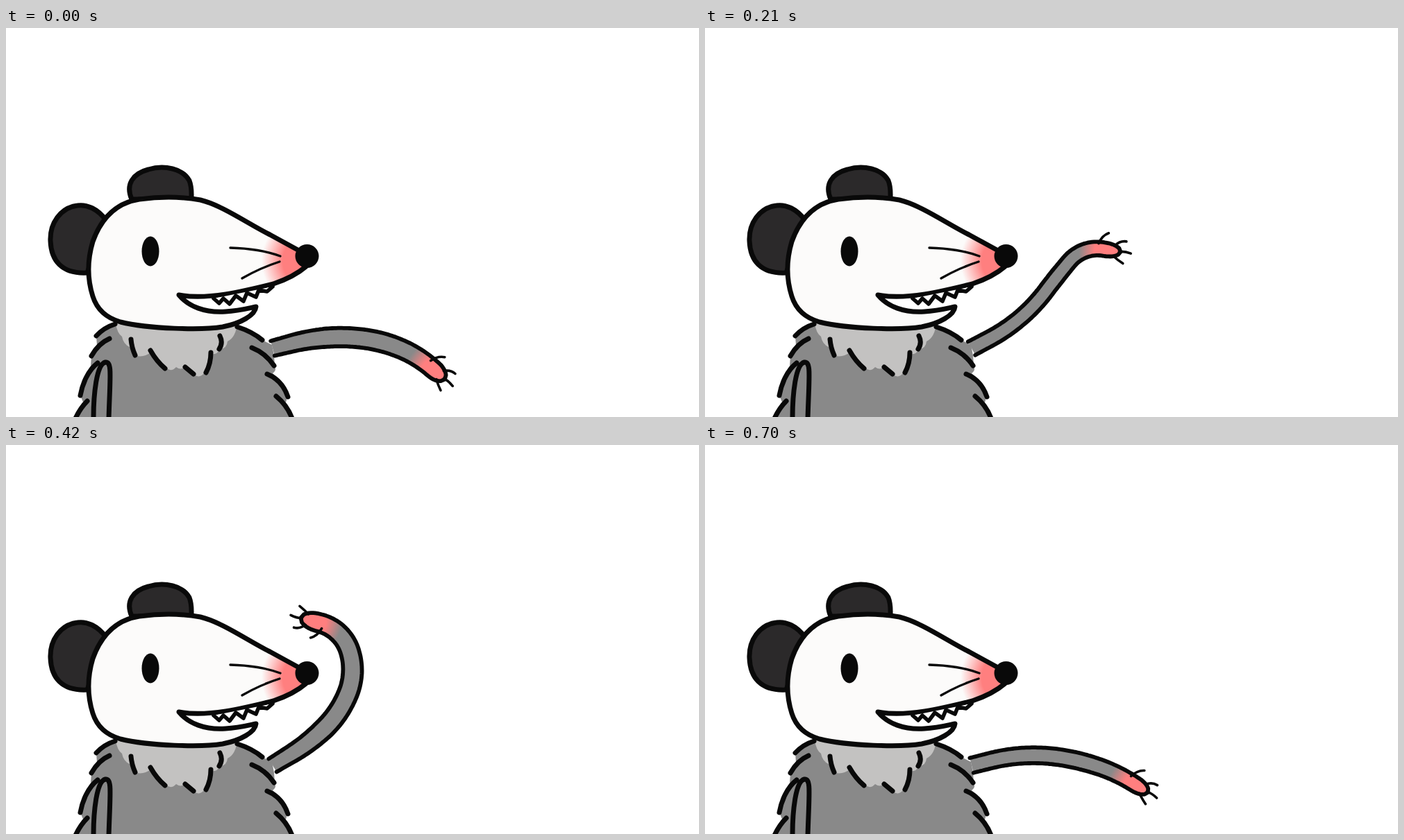
An HTML page that plays this animation: 998x561 px, repeating every 0.77 s.

```html
<!DOCTYPE html>
<html lang="en">
<head>
<meta charset="utf-8">
<title>Waving opossum</title>
<style>
  html, body { margin: 0; width: 100%; height: 100%; overflow: hidden; background: #fff; }
  svg { display: block; width: 100%; height: 100%; }
  .ink { fill: none; stroke: #090909; stroke-width: 7; stroke-linecap: round; stroke-linejoin: round; }
</style>
</head>
<body>
<svg viewBox="0 0 998 561">
  <defs>
    <radialGradient id="blush" gradientUnits="userSpaceOnUse" cx="436" cy="336" r="68">
      <stop offset=".55" stop-color="#ff7f7f"/>
      <stop offset="1" stop-color="#fcfbfa"/>
    </radialGradient>
    <radialGradient id="paw" gradientUnits="userSpaceOnUse" r="60">
      <stop offset=".62" stop-color="#ff7f7f"/>
      <stop offset="1" stop-color="#898989"/>
    </radialGradient>
  </defs>

  <!-- body and bib -->
  <path fill="#898989" d="M157 427L130 444L131 458L123 473L122 487Q110 508 107 530L112 542L100 563H412L403 540L406 530Q400 510 384 498Q390 494 387 488L386 472L383 457L369 450L333 431Z"/>
  <path fill="#c3c2c1" d="M158 426Q160 440 167 445Q169 456 178 460L188 473Q200 475 208 468L230 490Q238 497 245 489Q252 494 258 489L271 500Q279 506 286 497L295 470Q303 472 309 463Q318 462 319 452Q331 446 333 426Z"/>
  <path class="ink" d="M157 427Q141 432 130 444M149 448Q133 455 123 473M132 483C118 494 110 513 107 530M117 538Q107 548 100 563
    M126 563C126 530 130 485 143 482C153 481 150 500 148 563
    M333 431Q355 438 369 450M354 461Q374 469 386 487M376 499Q398 508 406 532M389 531Q405 544 412 563
    M180 449Q181 461 186 472M208 465Q217 481 229 491M258 489L270 499M295 468Q295 484 288 497M308 444Q313 454 307 463"/>

  <!-- head -->
  <g class="ink">
    <path fill="#2b292a" d="M144 277C132 261 117 254 103 256C78 259 63 282 64 307C65 335 80 355 117 353Z"/>
    <path fill="#2b292a" d="M181 247C172 226 182 210 205 204C228 197 255 203 264 220C268 230 267 238 267 247Z"/>
    <path fill="url(#blush)" d="M432 344C418 356 400 364 385 369C345 379 290 393 249 385C263 402 287 411 316 409C336 408 350 404 360 402C359 414 338 426 312 431C282 436 205 434 165 424C144 418 131 406 125 387C117 362 117 335 125 308C138 272 160 252 192 247C222 243 252 243 280 248C312 256 348 282 380 298L422 321"/>
    <path fill="#fff" d="M299 390L307 397L313 390L322 398L331 386L342 394L347 382L360 388L364 378L376 380L384 373" stroke-width="5.6"/>
    <path d="M323 317Q365 318 395 329M340 361Q366 346 394 337" stroke-width="3.4"/>
  </g>
  <ellipse cx="208" cy="322" rx="12.5" ry="21.5" fill="#090909"/>
  <circle cx="433.5" cy="329" r="17" fill="#090909"/>

  <!-- waving arm -->
  <path id="arm" class="ink" style="fill:url(#paw);stroke-width:5.8"/>
  <path id="claws" class="ink" style="stroke-width:3.6"/>
</svg>
<script>
const LOOP = 770, STEP = 70;
const SHOULDER = [384, 462], ARM_LENGTH = 266, SLICES = 100;

// Each part of the arm swings between two headings (degrees above horizontal);
// parts further out swing wider and reach their peak later.
const JOINTS = [
  { low: 14,  high: 35,  peak: 335, sharp: .5 },
  { low: 2,   high: 56,  peak: 325, sharp: .5 },
  { low: -10, high: 85,  peak: 335, sharp: .5 },
  { low: -23, high: 117, peak: 368, sharp: .5 },
  { low: -42, high: 165, peak: 422, sharp: 1.3 }
];

const $ = id => document.getElementById(id);
const fmt = p => p.map(v => v.toFixed(1)).join(" ");
const lerp = (a, b, f) => a + (b - a) * f;
const clamp = (v, lo, hi) => Math.max(lo, Math.min(hi, v));
const phase = ms => ms / LOOP * 2 * Math.PI;

// Periodic pulse: 1 at the peak, 0 half a loop away.
function pulse(t, peak, sharp) {
  const floor = Math.exp(-2 * sharp);
  return (Math.exp(sharp * (Math.cos(phase(t - peak)) - 1)) - floor) / (1 - floor);
}

// Heading at u along the arm, blended between the middles of neighbouring parts.
function headingAt(headings, u) {
  const s = clamp(u * headings.length - .5, 0, headings.length - 1);
  const i = Math.min(Math.floor(s), headings.length - 2);
  return lerp(headings[i], headings[i + 1], s - i) * Math.PI / 180;
}

// Widens from the shoulder, narrows at the wrist and ends in a round tip.
function halfWidth(u, full) {
  const body = lerp(11, full, clamp(u / .3, 0, 1)) * (1 - .1 * clamp((u - .6) / .4, 0, 1));
  return body * Math.sqrt(1 - clamp((u - .92) / .08, 0, 1) ** 2);
}

function drawArm(t) {
  const headings = JOINTS.map(j => lerp(j.low, j.high, pulse(t, j.peak, j.sharp)));
  const slice = ARM_LENGTH * (1 + .15 * pulse(t, 405, 2)) / SLICES;
  const full = 12 + 1.7 * Math.cos(2 * phase(t - 50));

  let [x, y] = SHOULDER, dx, dy;
  const upper = [], lower = [];
  for (let i = 0; i <= SLICES; i++) {
    const u = i / SLICES, angle = headingAt(headings, u), h = halfWidth(u, full);
    dx = Math.cos(angle);
    dy = -Math.sin(angle);
    upper.push(fmt([x + dy * h, y - dx * h]));
    lower.unshift(fmt([x - dy * h, y + dx * h]));
    if (i < SLICES) {
      x += dx * slice;
      y += dy * slice;
    }
  }
  $("arm").setAttribute("d", "M" + upper.concat(lower).join("L"));

  const local = (along, side) => fmt([x + dx * along + dy * side, y + dy * along - dx * side]);
  const fan = [-1, 0, 1].map(s => {
    const out = Math.abs(s);
    return `M${local(-2 - 7 * out, 8 * s)}Q${local(6 - 9 * out, 14 * s + 2)} ${local(15 - 9 * out, 16 * s)}`;
  });
  const thumb = `M${local(-33, 7)}Q${local(-30, 19)} ${local(-21, 24)}`;
  $("claws").setAttribute("d", fan.join("") + thumb);

  $("paw").setAttribute("cx", x);
  $("paw").setAttribute("cy", y);
}

function frame() {
  drawArm(Math.floor(performance.now() % LOOP / STEP) * STEP);
  requestAnimationFrame(frame);
}
frame();
</script>
</body>
</html>
```
